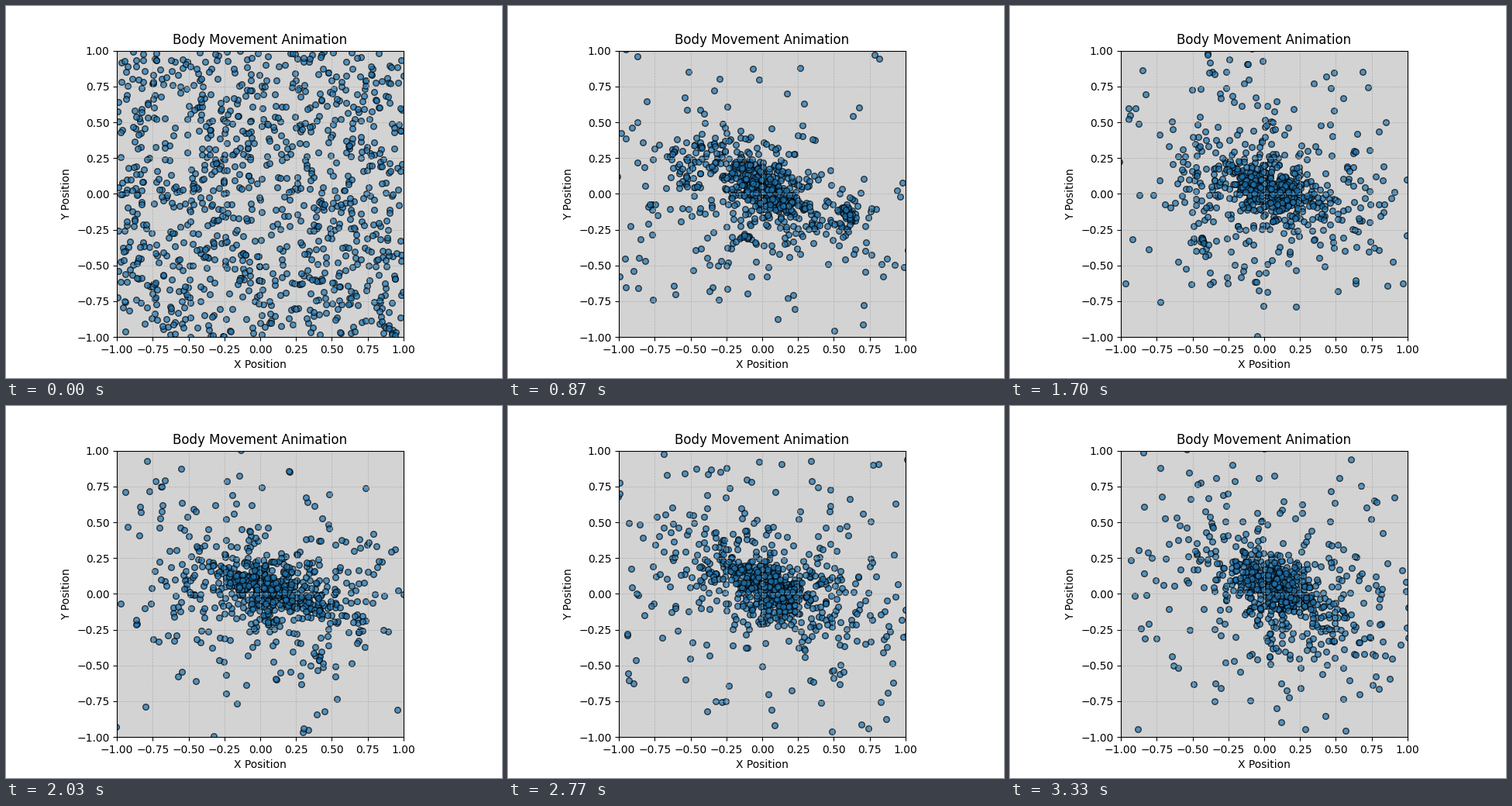
Write a matplotlib script that moves like this. It is 640 px wide and 480 px high and loops after 3360 ms.

```python
import numpy as np
import matplotlib.pyplot as plt
from matplotlib.animation import FuncAnimation

BODIES = 1000
FRAMES = 101
LOOP_MS = 3360
FRAME_TIME = 0.27
SUBSTEPS = 6
SOFTENING = 0.1
DRIFT = np.array([0.09, 0.045])


def gravity(pos):
    """Softened pull of all bodies on each other, total mass 1."""
    ones = np.ones((BODIES, 1), np.float32)
    sq = (pos * pos).sum(axis=1, keepdims=True)
    left = np.hstack([-2 * pos, sq, ones])
    right = np.hstack([pos, ones, sq + np.float32(SOFTENING ** 2)])
    dist2 = left @ right.T
    weight = 1 / (dist2 * np.sqrt(dist2))
    pull = weight @ np.hstack([pos, ones])
    return (pull[:, :2] - pos * pull[:, 2:]) / BODIES


def simulate():
    """Collapse of a cold square cloud into a dense core with a halo."""
    rng = np.random.default_rng(7)
    pos = rng.uniform(-1, 1, (BODIES, 2)).astype(np.float32)
    vel = np.zeros_like(pos)
    dt = FRAME_TIME / SUBSTEPS
    path = [pos.copy()]
    for _ in range(FRAMES - 1):
        for _ in range(SUBSTEPS):
            vel += gravity(pos) * dt
            pos += vel * dt
        path.append(pos.copy())
    return path


def follow_core(path):
    """Let the core wander slowly to the upper right."""
    return [
        pos - np.median(pos, axis=0) * min(1, k / 10) + DRIFT * k / (FRAMES - 1)
        for k, pos in enumerate(path)
    ]


path = follow_core(simulate())

fig, ax = plt.subplots(figsize=(6.4, 4.8), dpi=100)
ax.set_facecolor("lightgray")
ax.set_xlim(-1, 1)
ax.set_ylim(-1, 1)
ax.set_aspect("equal")
ax.set_title("Body Movement Animation")
ax.set_xlabel("X Position")
ax.set_ylabel("Y Position")
ax.grid(True, linestyle="--", linewidth=0.5)
dots = ax.scatter(*path[0].T, s=30, c="tab:blue", alpha=0.7, edgecolors="black")


def update(k):
    dots.set_offsets(path[k])
    return (dots,)


anim = FuncAnimation(fig, update, frames=FRAMES, interval=LOOP_MS / FRAMES,
                     repeat=True, repeat_delay=0)
plt.show()
```
